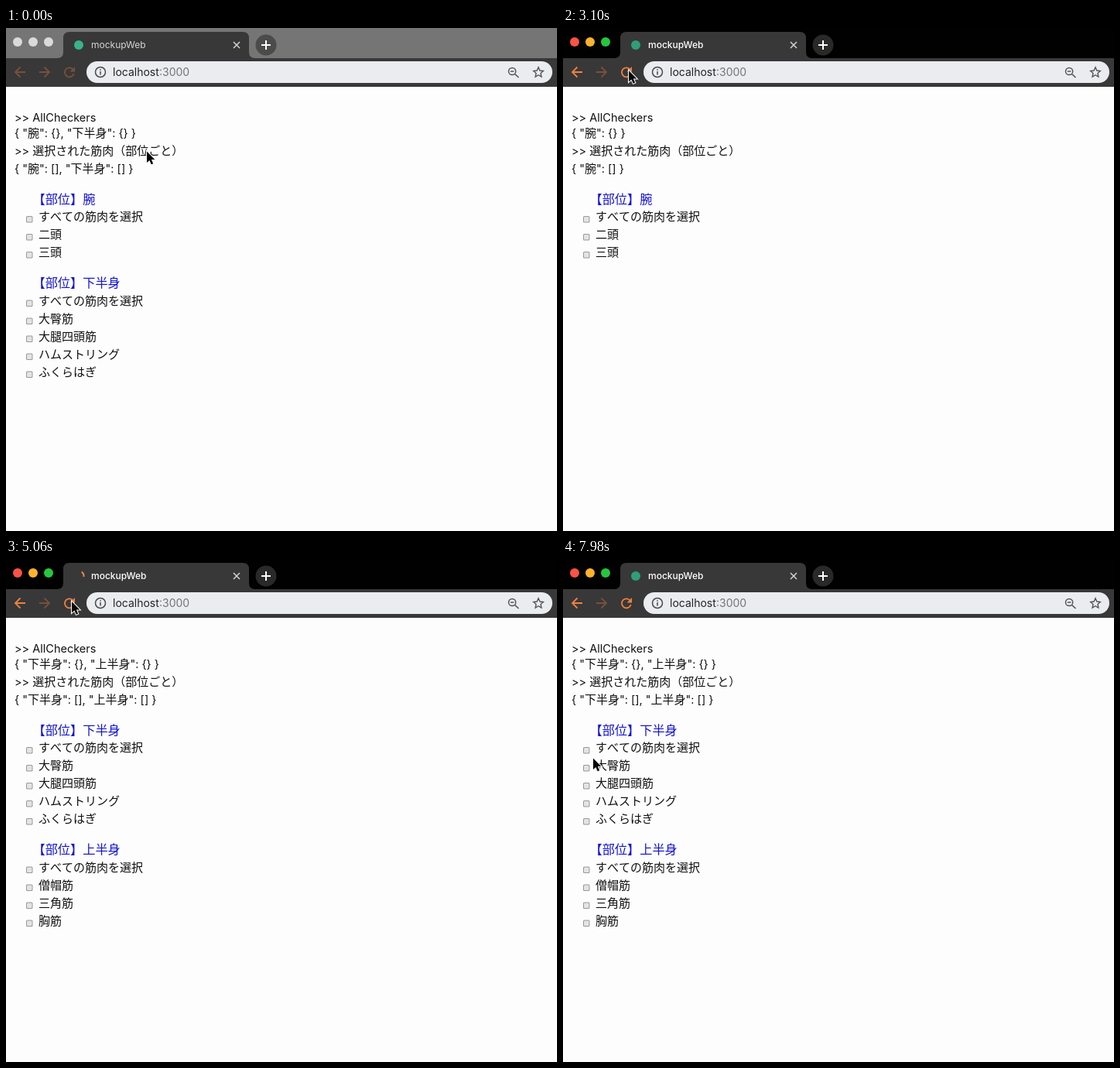
Write an HTML page with a canvas that moves like this. It is 712 px wide and 650 px high and loops after 8 s.

```html
<!DOCTYPE html>
<html lang="ja">
<head>
<meta charset="utf-8">
<title>Muscle checklist</title>
<style>
  html, body { margin: 0; width: 100%; height: 100%; overflow: hidden; }
  canvas { display: block; }
</style>
</head>
<body>
<canvas width="712" height="650"></canvas>
<script>
const ctx = document.querySelector('canvas').getContext('2d');
const LOOP = 8000;
const ACTIVATE = 1700;
const CHROME = '#383839';
const LATIN = 'Inter, sans-serif';
const JAPANESE = '"Noto Sans CJK JP", "Noto Sans CJK", sans-serif';

const parts = {
  腕: ['二頭', '三頭'],
  下半身: ['大臀筋', '大腿四頭筋', 'ハムストリング', 'ふくらはぎ'],
  上半身: ['僧帽筋', '三角筋', '胸筋'],
};
const pages = [
  { from: 0, names: ['腕', '下半身'] },
  { from: 2500, names: ['腕'] },
  { from: 5020, names: ['下半身', '上半身'] },
];
const reloads = [
  { start: 1800, spin: 2420, end: 2900 },
  { start: 4340, spin: 4960, end: 5700 },
];
// Pointer stops: time, x, y
const stops = [
  [0, 182, 159.5], [120, 182, 159.5], [800, 90, 60], [1400, 90, 60], [1660, 85, 55],
  [5860, 85, 55], [6520, 72, 241], [6900, 72, 241], [7420, 39, 257.5], [LOOP, 39, 257.5],
];

function label(text, x, y, size, color, weight = 400) {
  ctx.fillStyle = color;
  ctx.font = `${weight} ${size}px ${LATIN}`;
  ctx.fillText(text, x, y);
}

// Latin runs are set slightly smaller than the Japanese ones.
function mixed(text, x, y, size = 15, color = '#111') {
  ctx.fillStyle = color;
  for (const run of text.match(/[\x00-\x7f]+|[^\x00-\x7f]+/g)) {
    ctx.font = run.charCodeAt(0) < 128 ? `${size - 0.5}px ${LATIN}` : `${size}px ${JAPANESE}`;
    ctx.fillText(run, x, y);
    x += ctx.measureText(run).width;
  }
}

function disc(x, y, r, color) {
  ctx.fillStyle = color;
  ctx.beginPath();
  ctx.arc(x, y, r, 0, Math.PI * 2);
  ctx.fill();
}

function box(x, y, w, h, r, color) {
  ctx.fillStyle = color;
  ctx.beginPath();
  ctx.roundRect(x, y, w, h, r);
  ctx.fill();
}

function line(path, color, width = 1.6, x = 0, y = 0) {
  ctx.save();
  ctx.translate(x, y);
  ctx.strokeStyle = color;
  ctx.lineWidth = width;
  ctx.stroke(new Path2D(path));
  ctx.restore();
}

function drawTab(t, active) {
  ctx.fillStyle = CHROME;
  ctx.fill(new Path2D('M66 39Q74 39 74 31V13Q74 5 82 5H306Q314 5 314 13V31Q314 39 322 39Z'));

  const load = reloads.find(r => t >= r.start && t < r.end);
  if (!load) disc(94, 22, 6, active ? '#2f9f78' : '#38b48a');
  else if (t >= load.spin) {
    const angle = (t - load.spin) / 1000 * 2 * Math.PI - 1.6;
    ctx.strokeStyle = '#ee8848';
    ctx.lineWidth = 2;
    ctx.beginPath();
    ctx.arc(94, 22, 6.5, angle, angle + 1.1);
    ctx.stroke();
  }
  label('mockupWeb', 110, 26, 12, active ? '#fff' : '#d6d6d6', active ? 500 : 400);
  line('M-4-4 4 4M4-4-4 4', '#d4d4d4', 1.5, 298, 22);
  disc(336, 22, 13.5, active ? '#29292a' : '#4b4b4c');
  line('M-6 0H6M0-6V6', '#fff', 2, 336, 22);
}

function drawToolbar(active) {
  ctx.fillStyle = CHROME;
  ctx.fillRect(0, 39, 712, 37);
  const dim = '#79503a';
  const accent = active ? '#ee8140' : dim;
  line('M7 0H-6M0.5-6.5-6 0 0.5 6.5', accent, 1.8, 18, 57);
  line('M-7 0H6M-0.5-6.5 6 0-0.5 6.5', dim, 1.8, 50, 57);
  line('M5.2-2.6A6 6 0 1 0 5.7 2', accent, 1.8, 82, 57);
  ctx.fillStyle = accent;
  ctx.fill(new Path2D('M89 50V56.5H82.5Z'));

  box(104, 43, 602, 28, 14, '#ebecef');
  line('M-6.5 0A6.5 6.5 0 1 1 6.5 0A6.5 6.5 0 1 1-6.5 0M0-1V3.6M0-3.8V-2.2', '#48494c', 1.5, 122, 57);
  label('localhost', 138, 62, 14, '#222326');
  label(':3000', 198, 62, 14, '#737477');
  line('M-6-1A4.6 4.6 0 1 1 3.2-1A4.6 4.6 0 1 1-6-1M2 2.4 7 7M-3.6-1H0.8', '#535457', 1.5, 655.5, 57);
  line('M0-6.2 1.9-2 6.3-1.5 3 1.5 3.9 6 0 3.7-3.9 6-3 1.5-6.3-1.5-1.9-2Z', '#535457', 1.4, 688, 57);
}

function drawBrowser(t) {
  const active = t >= ACTIVATE;
  ctx.fillStyle = active ? '#010101' : '#757575';
  ctx.fillRect(0, 0, 712, 39);
  ['#fd5246', '#fdb32a', '#27c63f'].forEach((color, i) =>
    disc(15 + i * 20, 18, 6, active ? color : '#dadada'));
  drawTab(t, active);
  drawToolbar(active);
}

function drawPage(names) {
  const summary = empty => `{ ${names.map(n => `"${n}": ${empty}`).join(', ')} }`;
  mixed('>> AllCheckers', 11, 121);
  mixed(summary('{}'), 11, 141);
  mixed('>> 選択された筋肉（部位ごと）', 11, 164);
  mixed(summary('[]'), 11, 187);

  let y = 221;
  for (const name of names) {
    mixed(`【部位】${name}`, 34.5, y + 5.5, 16.2, '#1515d0');
    for (const item of ['すべての筋肉を選択', ...parts[name]]) {
      y += 23;
      box(26, y - 1, 8.5, 8.5, 1.5, '#999');
      box(27, y, 6.5, 6.5, 0.8, '#e4e4e4');
      mixed(item, 42, y + 5);
    }
    y += 39.5;
  }
}

function pointerAt(t) {
  const i = Math.max(1, stops.findIndex(s => s[0] > t));
  const [t0, x0, y0] = stops[i - 1], [t1, x1, y1] = stops[i];
  const p = (t - t0) / (t1 - t0);
  const eased = p * p * (3 - 2 * p);
  return [x0 + (x1 - x0) * eased, y0 + (y1 - y0) * eased];
}

function drawPointer(t) {
  const [x, y] = pointerAt(t);
  if (t > 6400 && x > 42 && y > 230) {
    const beam = 'M-3.5-7.5Q0-7.5 0-5V5Q0 7.5-3.5 7.5M3.5-7.5Q0-7.5 0-5V5Q0 7.5 3.5 7.5';
    line(beam, '#fff', 2.5, x, y);
    line(beam, '#111', 1.2, x, y);
    return;
  }
  const arrow = 'M0 0V14.5L3.4 11.4 5.7 16.8 8.2 15.8 5.9 10.5H10.3Z';
  line(arrow, '#fff', 2, x, y);
  ctx.save();
  ctx.translate(x, y);
  ctx.fillStyle = '#050505';
  ctx.fill(new Path2D(arrow));
  ctx.restore();
}

function frame() {
  const t = performance.now() % LOOP;
  ctx.fillStyle = '#fdfdfd';
  ctx.fillRect(0, 0, 712, 650);
  drawBrowser(t);
  drawPage(pages.findLast(p => t >= p.from).names);
  drawPointer(t);
  requestAnimationFrame(frame);
}
frame();
</script>
</body>
</html>
```
